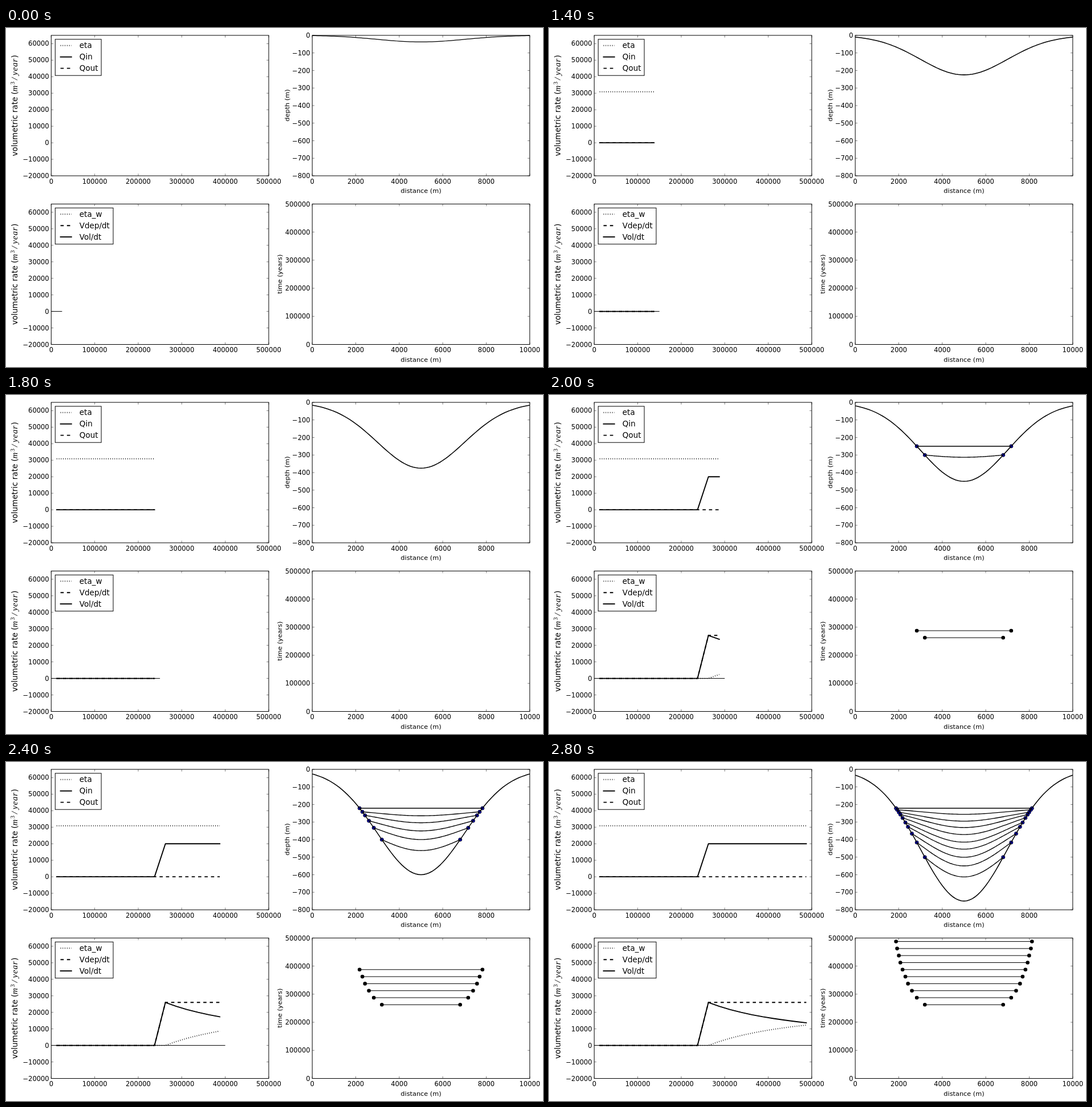
An HTML page that plays this animation: 942 px wide and 594 px high, repeating every 3.8 s.

```html
<!DOCTYPE html>
<html lang="en">
<head>
<meta charset="utf-8">
<title>Basin filling</title>
<style>
html, body { margin: 0; width: 100%; height: 100%; overflow: hidden; background: #fff; }
svg { display: block; width: 942px; height: 594px; }
text { font-family: "DejaVu Sans", sans-serif; font-size: 11.5px; fill: #000; }
.name { font-size: 11.3px; }
.big { font-size: 13.5px; }
.math { font-family: "Liberation Serif", serif; font-style: italic; font-size: 15px; letter-spacing: .8px; }
.sup { font-family: "Liberation Serif", serif; font-size: 10px; }
path, rect { fill: none; stroke: #000; }
.frame { stroke-width: 1; }
.tick { stroke-width: .5; }
.thin { stroke-width: 1; }
.layer { stroke-width: 1.35; }
.solid { stroke-width: 1.9; stroke-linecap: square; stroke-linejoin: round; }
.dash { stroke-width: 1.9; stroke-dasharray: 5.64 5.64; }
.dots { stroke-width: 1.9; stroke-dasharray: .94 2.82; }
.shore { fill: #0000e0; stroke: #000; stroke-width: .94; }
</style>
</head>
<body>
<svg viewBox="0 0 942 594"><g id="axes"></g><g id="data"></g></svg>
<script>
const LOOP = 3800, HOLD = 1000, STEP = 100, LAST = 20;
const DT = 25000, SIGMA = 2000, SINK = 37.5, FIRST = 11, DEPOSIT = 26000;
// half width of the lake when each layer is laid down
const HALF = [1800, 2170, 2395, 2575, 2695, 2825, 2925, 2995, 3075, 3125];

const panel = (x0, y0, xMax, yMin, yMax, xStep, yStep) => {
  const w = 381.6, h = 246.1;
  return { x0, y0, w, h, xMax, yMin, yMax, xStep, yStep,
    x: v => x0 + v / xMax * w,
    y: v => y0 + (yMax - v) / (yMax - yMin) * h };
};
const rates = panel(79.3, 12.9, 500000, -20000, 65000, 100000, 10000);
const volumes = panel(79.3, 308.4, 500000, -20000, 65000, 100000, 10000);
const section = panel(537.2, 12.9, 10000, -800, 0, 2000, 100);
const history = panel(537.2, 308.4, 10000, 0, 500000, 2000, 100000);

const path = (cls, d) => `<path class="${cls}" d="${d}"/>`;
const text = (x, y, s, anchor = 'start', cls = '') =>
  `<text x="${x}" y="${y}" text-anchor="${anchor}" class="${cls}">${s}</text>`;
const turned = (x, y, inner) => `<g transform="translate(${x} ${y}) rotate(-90)">${inner}</g>`;
const label = v => String(v).replace('-', '\u2212');
const line = (p, pts) => 'M' + pts.map(([x, y]) => p.x(x).toFixed(2) + ' ' + p.y(y).toFixed(2)).join('L');

function drawAxes(p, xLabelMax) {
  const right = p.x0 + p.w, bottom = p.y0 + p.h, len = 3.76;
  let ticks = '', out = '';
  for (let v = 0; v <= p.xMax; v += p.xStep) {
    const x = p.x(v);
    ticks += `M${x} ${p.y0}v${len}M${x} ${bottom}v${-len}`;
    if (v <= xLabelMax) out += text(x, bottom + 13.7, label(v), 'middle');
  }
  for (let v = p.yMin; v <= p.yMax; v += p.yStep) {
    const y = p.y(v);
    ticks += `M${p.x0} ${y}h${len}M${right} ${y}h${-len}`;
    out += text(p.x0 - 3.6, y + 4.1, label(v), 'end');
  }
  return out + path('tick', ticks) +
    `<rect class="frame" x="${p.x0}" y="${p.y0}" width="${p.w}" height="${p.h}"/>`;
}

function legend(y, width, rows) {
  return `<rect class="frame" x="86.3" y="${y}" width="${width}" height="63.4" style="fill:#fff"/>` +
    rows.map(([cls, name], i) => {
      const mid = y + 11 + i * 19.9;
      return path(cls, `M95.6 ${mid}h19.2`) + text(128.8, mid + 4.4, name, 'start', 'big');
    }).join('');
}

const rateLabel = mid => turned(19.7, mid + 88.5,
  text(0, 0, 'volumetric rate (', 'start', 'big') + text(113, 0, 'm', 'start', 'math') +
  text(125.5, -5, '3', 'start', 'sup') + text(133.5, 0, '/', 'start', 'math') +
  text(141.5, 0, 'year', 'start', 'math') + text(172, 0, ')', 'start', 'big'));

document.getElementById('axes').innerHTML =
  drawAxes(rates, 500000) + drawAxes(volumes, 500000) +
  drawAxes(section, 8000) + drawAxes(history, 10000) +
  rateLabel(136) + rateLabel(431.5) +
  text(728, 289.3, 'distance (m)', 'middle', 'name') +
  text(728, 584.9, 'distance (m)', 'middle', 'name') +
  turned(496.6, 135.5, text(0, 0, 'depth (m)', 'middle', 'name')) +
  turned(483.8, 431.2, text(0, 0, 'time (years)', 'middle', 'name')) +
  legend(19.8, 80.8, [['dots', 'eta'], ['solid', 'Qin'], ['dash', 'Qout']]) +
  legend(315.3, 101.7, [['dots', 'eta_w'], ['dash', 'Vdep/dt'], ['solid', 'Vol/dt']]);

const bell = r => Math.exp(-r * r / (2 * SIGMA * SIGMA));
// volume per year sinking below the rim of the basin
const ETA = SINK / DT * Math.PI * (2 * SIGMA ** 2 * (1 - bell(5000)) - 5000 ** 2 * bell(5000));
const time = n => (n - .5) * DT;
const deposit = n => n >= FIRST ? DEPOSIT : 0;
// the share of the fill that sinks again grows with the layers already laid down
const waterLoss = n => n > FIRST ? DEPOSIT * (n - FIRST) / (n - 1) : 0;

function series(p, cls, n, f) {
  if (n < 2) return '';
  return path(cls, line(p, Array.from({ length: n }, (_, i) => [time(i + 1), f(i + 1)])));
}

function curve(half, f) {
  const n = 80;
  return line(section, Array.from({ length: n + 1 }, (_, i) => {
    const r = half * (2 * i / n - 1);
    return [5000 + r, f(r)];
  }));
}

function drawData(n) {
  let shores = '', layers = '', past = '';
  for (let j = FIRST; j <= n; j++) {
    const half = HALF[j - FIRST], level = -SINK * j * bell(half);
    const depth = r => level - SINK * (n - j) * bell(r);
    layers += path('layer', curve(half, depth));
    past += path('thin', line(history, [[5000 - half, time(j)], [5000 + half, time(j)]]));
    for (const x of [5000 - half, 5000 + half]) {
      shores += `<circle class="shore" cx="${section.x(x)}" cy="${section.y(depth(half))}" r="3"/>`;
      past += `<circle cx="${history.x(x)}" cy="${history.y(time(j))}" r="3.3"/>`;
    }
  }
  const basin = `<g style="stroke-width:${n > 1 ? 1.55 : 1.25}">` +
    path('', curve(5000, r => -SINK * n * bell(r))) + '</g>';
  return series(rates, 'dots', n, () => ETA) +
    series(rates, 'solid', n, i => i >= FIRST ? 20000 : 0) +
    series(rates, 'dash', n, () => 0) +
    path('thin', line(volumes, [[0, 0], [n * DT, 0]])) +
    series(volumes, 'dots', n, waterLoss) +
    series(volumes, 'dash', n, deposit) +
    series(volumes, 'solid', n, i => deposit(i) - waterLoss(i)) +
    shores + basin + layers + past;
}

const data = document.getElementById('data');
const start = performance.now();
let shown = 0;
function tick() {
  const t = (performance.now() - start) % LOOP;
  const n = t < HOLD ? 1 : Math.min(LAST, Math.floor((t - HOLD) / STEP) + 2);
  if (n !== shown) data.innerHTML = drawData(shown = n);
  requestAnimationFrame(tick);
}
tick();
</script>
</body>
</html>
```
